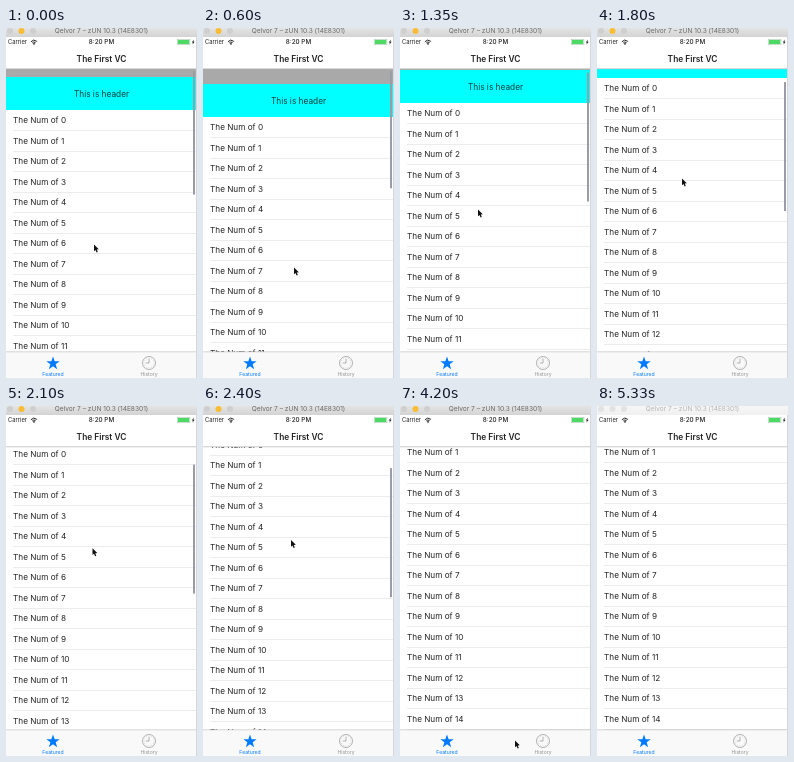
These frames come from a looping animation (191x350 px, 5430 ms). An HTML page with a canvas:

```html
<!DOCTYPE html>
<html lang="en">
<head>
<meta charset="utf-8">
<title>Table header scrolling</title>
<style>
  html, body { margin: 0; width: 191px; height: 350px; overflow: hidden; background: #fff; }
  canvas { display: block; width: 191px; height: 350px; }
</style>
</head>
<body>
<canvas id="stage"></canvas>
<script>
const W = 191, H = 350, LOOP = 5430, STEP = 150, BLUR_AT = 5330;
const NAV_END = 41, TAB_TOP = 324, HEADER = 33, ROW = 20.5;
const canvas = document.getElementById('stage');
const dpr = window.devicePixelRatio || 1;
canvas.width = W * dpr;
canvas.height = H * dpr;
const c = canvas.getContext('2d');
c.scale(dpr, dpr);

// Key points: time, then header top or pointer tip.
const scrollKeys = [
  [0, 49], [450, 50], [600, 56], [900, 56], [1350, 42], [1500, 30],
  [1650, 30], [1800, 17], [2250, -1], [3000, -17.5]
];
const pointerKeys = [
  [0, 88, 216], [450, 90, 223], [600, 91, 239], [900, 91, 235], [1350, 78, 181],
  [1500, 77, 181], [1800, 85, 150], [3000, 91, 117], [3300, 91, 117], [3600, 127, 143],
  [3750, 121, 204], [3900, 76, 245], [4050, 76, 245], [4200, 115, 334]
];

function along(keys, t) {
  const i = keys.findIndex(k => k[0] > t);
  if (i < 0) return keys.at(-1).slice(1);
  const [a, b] = [keys[i - 1], keys[i]];
  const p = (t - a[0]) / (b[0] - a[0]);
  return a.slice(1).map((v, n) => v + (b[n + 1] - v) * p);
}

function rect(x, y, w, h, color) {
  c.fillStyle = color;
  c.fillRect(x, y, w, h);
}

function text(str, x, y, size, { color = '#222', weight = 400, align = 'center' } = {}) {
  c.font = `${weight} ${size}px Inter, Roboto, sans-serif`;
  c.textAlign = align;
  c.fillStyle = color;
  c.fillText(str, x, y + size * 0.36);
}

function disc(x, y, r, color) {
  c.fillStyle = color;
  c.beginPath();
  c.arc(x, y, r, 0, 7);
  c.fill();
}

function polygon(points, x, y) {
  c.beginPath();
  points.forEach(([dx, dy]) => c.lineTo(x + dx, y + dy));
  c.closePath();
}

function drawTable(top) {
  const edge = Math.round(top);
  rect(0, NAV_END, W, TAB_TOP - NAV_END, '#fff');
  rect(0, NAV_END, W, Math.max(0, edge - NAV_END), '#a9a9a9');
  rect(0, edge, W, HEADER, '#0ff');
  text('This is header', W / 2, top + 17, 8.3, { color: '#143c3c' });
  for (let i = 0; i < 16; i++) {
    const y = top + HEADER + i * ROW;
    text('The Num of ' + i, 7, y + ROW / 2, 8.2, { align: 'left' });
    rect(7, Math.round(y + ROW - 0.5), W - 7, 1, '#ececee');
  }
}

function drawScrollbar(top, alpha) {
  const y = Math.max(43, 60.5 - 0.38 * top);
  const h = 129 - Math.max(0, top - 43) * 0.9;
  c.globalAlpha = alpha;
  rect(187, y, 2, h, '#9a9ca6');
  c.globalAlpha = 1;
}

function drawWindowBar(active) {
  const bar = c.createLinearGradient(0, 0, 0, 9);
  bar.addColorStop(0, active ? '#e4e4e4' : '#f6f6f6');
  bar.addColorStop(1, active ? '#d3d3d3' : '#f0f0f0');
  rect(0, 0, W, 9, bar);
  const idle = active ? '#cfcfcf' : '#e2e2e2';
  [idle, active ? '#f8bd35' : idle, idle].forEach((color, i) => disc(4 + i * 11.5, 3, 3, color));
  text('Qelvor 7 – zUN 10.3 (14E8301)', 95.5, 3, 6.6, { color: active ? '#6a6a6a' : '#b4b4b4' });
}

function drawNavigation() {
  rect(0, 9, W, NAV_END - 9, '#fff');
  text('Carrier', 2, 14, 5.8, { align: 'left' });
  c.strokeStyle = '#222';
  c.lineWidth = 1;
  for (const r of [2.2, 4]) {
    c.beginPath();
    c.arc(28, 16.3, r, -Math.PI * 0.78, -Math.PI * 0.22);
    c.stroke();
  }
  disc(28, 15.8, 0.9, '#222');
  text('8:20 PM', W / 2, 14, 6.3, { weight: 500 });

  c.strokeStyle = '#a5c9ab';
  c.lineWidth = 0.6;
  c.strokeRect(171.3, 11.3, 12.6, 5.4);
  rect(172, 12, 11.2, 4, '#4cd964');
  polygon([[2, 0], [0, 3], [1.2, 3], [0.6, 5.4], [2.8, 2.3], [1.6, 2.3]], 185.8, 11.4);
  c.fillStyle = '#222';
  c.fill();

  text('The First VC', W / 2, 30.8, 8.4, { weight: 600 });
  rect(0, NAV_END - 0.5, W, 0.7, '#b2b2b2');
}

const star = Array.from({ length: 10 }, (_, i) => {
  const r = i % 2 ? 2.8 : 7, a = i * Math.PI / 5 - Math.PI / 2;
  return [r * Math.cos(a), r * Math.sin(a)];
});

function drawTabs() {
  rect(0, TAB_TOP, W, H - TAB_TOP, '#f9f9f9');
  rect(0, TAB_TOP - 0.5, W, 0.7, '#c4c4c4');

  polygon(star, 47, 335.5);
  c.fillStyle = '#007aff';
  c.fill();
  text('Featured', 47, 346, 5.1, { color: '#007aff' });

  c.strokeStyle = '#929292';
  c.lineWidth = 0.7;
  c.beginPath();
  c.arc(143, 335, 6.5, 0, 7);
  c.moveTo(143, 331);
  c.lineTo(143, 335);
  c.lineTo(139.8, 335);
  c.stroke();
  for (let i = 0; i < 12; i++) {
    const a = i * Math.PI / 6;
    disc(143 + 4.8 * Math.cos(a), 335 + 4.8 * Math.sin(a), 0.35, '#aaa');
  }
  text('History', 143, 346, 5.1, { color: '#929292' });
}

function drawPointer(x, y) {
  polygon([[0, 0], [0, 6.8], [1.5, 5.4], [2.6, 8], [3.8, 7.5], [2.8, 5], [4.8, 4.8]], x, y + 0.5);
  c.strokeStyle = '#fff';
  c.lineWidth = 1;
  c.stroke();
  c.fillStyle = '#111';
  c.fill();
}

const start = performance.now();

function draw(now) {
  const t = Math.max(0, now - start) % LOOP;
  const held = Math.floor(t / STEP) * STEP;
  const [top] = along(scrollKeys, held);
  drawTable(top);
  drawScrollbar(top, Math.max(0, Math.min(1, (3600 - held) / 300)));
  drawWindowBar(t < BLUR_AT);
  drawNavigation();
  drawTabs();
  rect(W - 1, 9, 1, H - 9, '#d4d6dc');
  if (held < 4350) drawPointer(...along(pointerKeys, held));
  requestAnimationFrame(draw);
}
draw(start);
</script>
</body>
</html>
```
